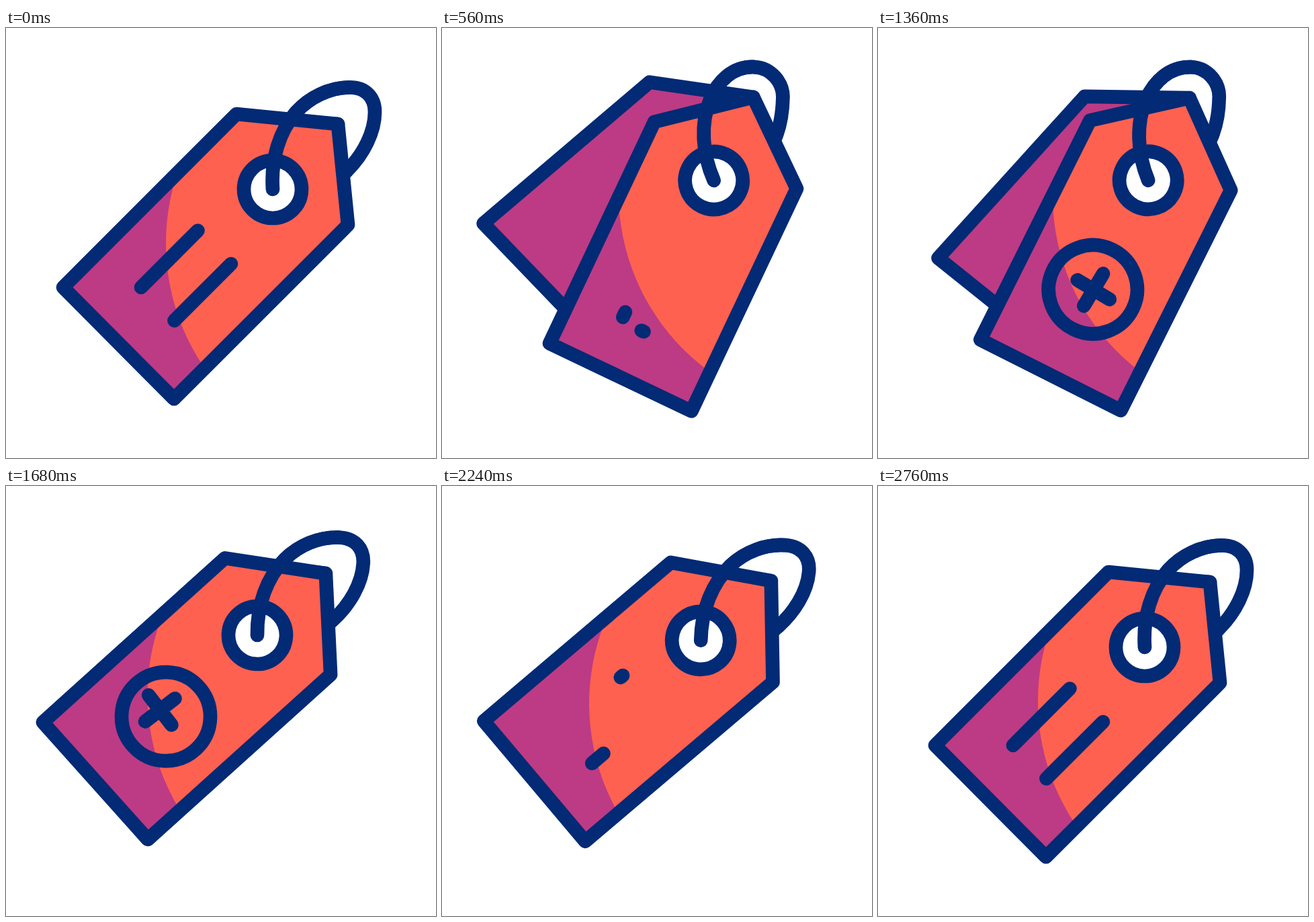
An HTML page that plays this animation: 640 by 640 pixels, repeating every 3 s.

```html
<!DOCTYPE html>
<html lang="en">
<head>
<meta charset="utf-8">
<title>Price tags</title>
<style>
html, body { margin: 0; width: 100%; height: 100%; overflow: hidden; background: #fff; }
svg { display: block; width: 100vw; height: 100vh; }
.ink { fill: none; stroke: #032a75; stroke-width: 20.7; stroke-linecap: round; stroke-linejoin: round; }
</style>
</head>
<body>
<svg viewBox="0 0 640 640">
  <defs>
    <path id="outline" d="M343 128L494 143L509 293L250 552L85 386Z"/>
    <clipPath id="body"><use href="#outline"/></clipPath>
  </defs>
  <g id="strap"><path id="loopBack" class="ink"/></g>
  <g id="back">
    <path class="ink" style="fill:#bc3b84" d="M494 143L338.3 133.2L108.8 362.7L269.8 505.2Z"/>
  </g>
  <g id="front">
    <g clip-path="url(#body)">
      <rect width="640" height="640" fill="#bc3b84"/>
      <circle cx="567" cy="320.5" r="329" fill="#ff6150"/>
    </g>
    <use href="#outline" class="ink"/>
    <circle class="ink" style="fill:#fff" cx="397" cy="240" r="43"/>
    <path id="line1" class="ink"/>
    <path id="line2" class="ink"/>
    <path id="ring" class="ink"/>
    <path id="cross" class="ink"/>
    <path id="loopFront" class="ink"/>
  </g>
</svg>
<script>
const LOOP = 3000, HALF = 1500;
const CORNER = [494, 143], BADGE = [267.5, 368], RADIUS = 66;
const STRAP = [[397, 240], [394, 195], [407, 153], [432, 125], [452, 103], [481, 89], [511, 88],
  [534, 88], [549, 102], [549, 125], [549, 155], [532, 188], [508, 212]];

const el = id => document.getElementById(id);
const draw = (id, d) => el(id).setAttribute('d', d);
const mix = (p, q, k) => p.map((v, i) => v + (q[i] - v) * k);
const polar = ([x, y], r, deg) =>
  [x + r * Math.cos(deg * Math.PI / 180), y + r * Math.sin(deg * Math.PI / 180)];

const smooth = x => x * x * (3 - 2 * x);
const span = (t, from, to) => Math.min(1, Math.max(0, (t - from) / (to - from)));
const ease = (t, from, to) => smooth(span(t, from, to));

function place(id, [dx, dy], turn) {
  const [x, y] = CORNER;
  el(id).setAttribute('transform', `translate(${dx} ${dy}) rotate(${turn} ${x} ${y})`);
}

// part of the segment p-q between fractions a and b
function segment(id, p, q, a, b) {
  draw(id, b - a < 0.002 ? '' : `M${mix(p, q, a)}L${mix(p, q, b)}`);
}

// the strap's far end folds towards the tag as it swings down
function strap(sag) {
  const bump = (i, from, to) => Math.sin(Math.PI * span(i, from, to)) ** 2 * sag;
  const pts = STRAP.map(([x, y], i) => [x - 24 * bump(i, 7, 13), y + 40 * bump(i, 4.9, 12.5)]);
  pts[6] = mix(pts[5], pts[7], 0.566);
  pts[9] = mix(pts[8], pts[10], 0.434);
  const curve = n => `M${pts[0]}C${pts.slice(1, n).join(' ')}`;
  draw('loopBack', curve(13) + 'L487 234');
  draw('loopFront', curve(7));
}

function ring(p) {
  const gap = (1 - p) * 180, arc = `A${RADIUS} ${RADIUS} 0 0 1 `;
  const at = deg => polar(BADGE, RADIUS, deg);
  draw('ring', p < 0.002 ? '' : `M${at(gap - 46)}${arc}${at(134)}${arc}${at(314 - gap)}`);
}

function cross(p, shift) {
  const mid = polar(BADGE, shift, 45);
  const bar = deg => `M${polar(mid, 28 * p, deg)}L${polar(mid, -28 * p, deg)}`;
  draw('cross', p < 0.002 ? '' : bar(49.4) + bar(139.4));
}

function render(t) {
  const open = smooth(span(t, 0, 600) ** 1.5);
  const close = ease(t, 1277, 1830);
  const settle = ease(t, 1750, 2500);
  const relax = ease(t, 1830, 2760);
  const spread = ease(t, 208, 600) - ease(t, 1134, 1680);

  const turn = -20.2 * open + 28.2 * close - 8 * relax;
  const move = [-31.5 * open + 16.3 * close + 15.2 * settle,
                -41.1 * open + 34.4 * close + 6.7 * settle];
  place('front', move, turn);
  place('strap', move, turn);
  place('back', move, turn + 25 * spread);
  strap(Math.max(0, -turn / 20) ** 1.3);

  // each line leaves towards one end and regrows from the other
  const early = t < HALF;
  const keep = early ? 1 - ease(t, 290, 560) : 1;
  segment('line1', [285.5, 301.5], [201, 386], ease(t, 360, 600) * early, early ? 1 : ease(t, 2200, 2560));
  segment('line2', [335, 351], [250.5, 435.5], early ? 0 : 1 - ease(t, 2141, 2500), keep);

  ring(ease(t, 540, 905) - ease(t, 1740, 2100));
  cross(ease(t, 560, 760) - ease(t, 1780, 2040),
    30 - 29 * ease(t, 760, 1200) - 28 * ease(t, 1480, 1880));
}

function tick() {
  render(performance.now() % LOOP);
  requestAnimationFrame(tick);
}
tick();
</script>
</body>
</html>
```
